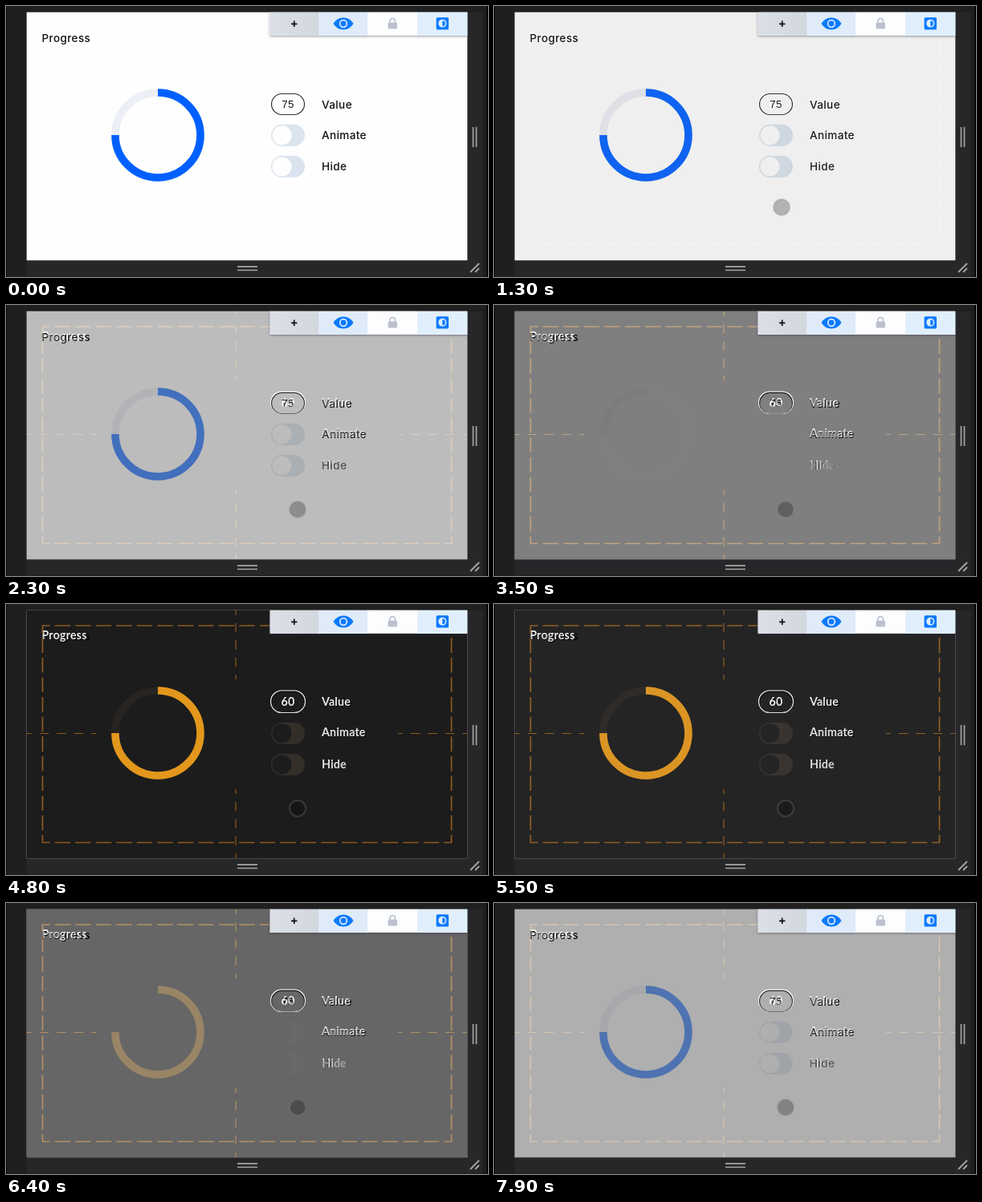
These frames come from a looping animation (600 px wide and 338 px high, 8000 ms). An HTML page:

```html
<!DOCTYPE html>
<html lang="en">
<head>
<meta charset="utf-8">
<title>Progress</title>
<style>
  html, body { margin: 0; width: 100%; height: 100%; overflow: hidden; background: #1f1f1f; }
  svg { display: block; width: 100vw; height: 100vh; }
  .live { font: 500 13.5px Inter, sans-serif; letter-spacing: .4px; }
  .mock { font: 700 14.2px Lato, sans-serif; letter-spacing: .2px; }
  .live .num { font: 13.3px "Liberation Sans", sans-serif; letter-spacing: .4px; }
  .num { text-anchor: middle; }
</style>
</head>
<body>
<svg viewBox="0 0 600 338">
  <defs>
    <clipPath id="page"><rect x="25.7" y="7.7" width="548.6" height="309.5"/></clipPath>
    <filter id="shadow" x="-10%" y="-30%" width="120%" height="180%">
      <feDropShadow dx="0" dy="1" stdDeviation="1.5" flood-color="#334" flood-opacity=".5"/>
    </filter>
    <linearGradient id="cell">
      <stop offset="0" stop-color="#dbdfe6"/><stop offset="1" stop-color="#d3d7de"/>
    </linearGradient>
  </defs>

  <rect width="600" height="338" fill="#1f1f1f"/>
  <path d="M0 0H1V338H0ZM598 0h2v338h-2Z" fill="#050505"/>
  <path d="M26 317H574V8H593V337H26Z" fill="#27272a"/>
  <path d="M581.5 151v25M585.5 151v25M288 325.2h25M288 329.5h25" stroke="#a6a6a6" stroke-width="1.7"/>
  <path d="M578 332l11-11M584 332l5-5" stroke="#a6a6a6" stroke-width="1.8"/>

  <g clip-path="url(#page)">
    <g id="live" class="live"></g>
    <g id="mock" class="mock"></g>
    <g filter="url(#shadow)">
      <rect x="328.7" y="7" width="246" height="29.8" fill="#fcfdff"/>
      <rect x="328.7" y="7" width="60.3" height="29.8" fill="url(#cell)"/>
      <rect x="389" y="7" width="61" height="29.8" fill="#dfebf9"/>
      <rect x="512" y="7" width="63" height="29.8" fill="#e1effd"/>
    </g>
    <path d="M355 22.3h7.4M358.7 18.6v7.4" stroke="#111" stroke-width="1.7"/>
    <path d="M407.5 22Q412 14.5 420 14.5T432.5 22Q428 29.5 420 29.5T407.5 22Z" fill="#0a7aff"/>
    <circle cx="420" cy="22" r="4.3" fill="none" stroke="#dfebf9" stroke-width="1.7"/>
    <rect x="475.5" y="20.5" width="11.5" height="8" rx="1.5" fill="#bcc1cf"/>
    <path d="M478 21v-2.2a3.2 3.2 0 0 1 6.4 0V21" fill="none" stroke="#bcc1cf" stroke-width="1.6"/>
    <rect x="535.6" y="14.2" width="15.4" height="15.2" rx="1.5" fill="#0a7aff"/>
    <circle cx="543.3" cy="21.8" r="5" fill="#e1effd"/>
    <path d="M543.3 18.3a3.5 3.5 0 0 1 0 7Z" fill="#0a7aff"/>
  </g>

  <g id="cursor">
    <circle r="10" fill="#000" fill-opacity=".25"/>
    <circle r="10" fill="none" stroke="#808080" stroke-opacity=".3" stroke-width="2"/>
  </g>
</svg>
<script>
const $ = id => document.getElementById(id);

// One version of the card; rows holds the label baselines
function card({ page, ink, line, track, bar, off, rows, num, box }) {
  const toggle = y => `
    <rect x="330" y="${y - 13.5}" width="42" height="27" rx="13.5" fill="${off}"/>
    <circle cx="343.5" cy="${y}" r="12" fill="${page}"/>`;
  const labels = ['Progress', 'Value', 'Animate', 'Hide'].map((s, i) =>
    `<text x="${i ? 393 : 44.5}" y="${rows[i]}" fill="${ink}">${s}</text>`).join('');
  const [x, y, w, h] = box;
  return `
    <rect x="25" y="7" width="550" height="311" fill="${page}"/>
    <g fill="none" stroke-width="9.6">
      <circle cx="189" cy="161" r="53" stroke="${track}"/>
      <path d="M189 108A53 53 0 1 1 136 161" stroke="${bar}"/>
    </g>
    <rect x="${x}" y="${y}" width="${w}" height="${h}" rx="${h / 2}" fill="${page}" stroke="${line}" stroke-width="1.2"/>
    <text class="num" x="351" y="127" fill="${ink}">${num}</text>
    ${toggle(161.3)}${toggle(200.3)}${labels}`;
}

$('live').innerHTML = card({
  page: '#fefefe', ink: '#111', line: '#333', track: '#eceff5', bar: '#0060ff',
  off: '#dbe4ee', rows: [44.5, 127.5, 166, 205], num: 75, box: [330.5, 109.5, 41, 26]
});

// Dashed guides: every side starts and ends on half a dash
const sides = (d, length) =>
  `<path d="${d}" pathLength="${length}" stroke-width="1.7" stroke-dasharray="19 6" stroke-dashoffset="9.5"/>`;
$('mock').innerHTML = card({
  page: '#000', ink: '#f4f4f4', line: '#f4f4f4', track: '#0f0b07', bar: '#ff9f00',
  off: '#1f1810', rows: [43.6, 127, 165.2, 205.4], num: 60, box: [329.6, 108, 42.8, 27.5]
}) + `<g fill="none" stroke="#804600">
    ${sides('M45 27H555', 500)}${sides('M45 297.5H555', 500)}
    ${sides('M45.5 27V297.5', 275)}${sides('M554.5 27V297.5', 275)}
    <path d="M286 8V94M286 231V317M26 161.5H112M488 161.5H574" stroke-width="1.2"
      stroke-dasharray="11.5 10" stroke-dashoffset="5.75"/>
  </g>`;

// Piecewise linear value through [time, value] points
function along(points, t) {
  let [t0, v0] = points[0];
  for (const [t1, v1] of points) {
    if (t < t1) return v0 + (v1 - v0) * (t - t0) / (t1 - t0);
    [t0, v0] = [t1, v1];
  }
  return v0;
}

const fade = [[0, 0], [1000, 0], [3500, .5], [4100, .5], [5000, 1], [5500, .86], [6400, .6], [7700, .31]];

function draw(now) {
  const t = Math.floor(now % 8000 / 100) * 100;
  $('mock').style.opacity = along(fade, t);
  const rest = (1 - along([[0, 0], [600, 1]], t)) ** 2;
  const drift = along([[0, 0], [1300, 0], [1900, 1]], t);
  const x = 358 + 116 * rest + 5 * drift, y = 251 + 98 * rest + 4 * drift;
  $('cursor').setAttribute('transform', `translate(${x} ${y})`);
  $('cursor').setAttribute('visibility', t < 100 ? 'hidden' : 'visible');
  requestAnimationFrame(draw);
}
requestAnimationFrame(draw);
</script>
</body>
</html>
```
